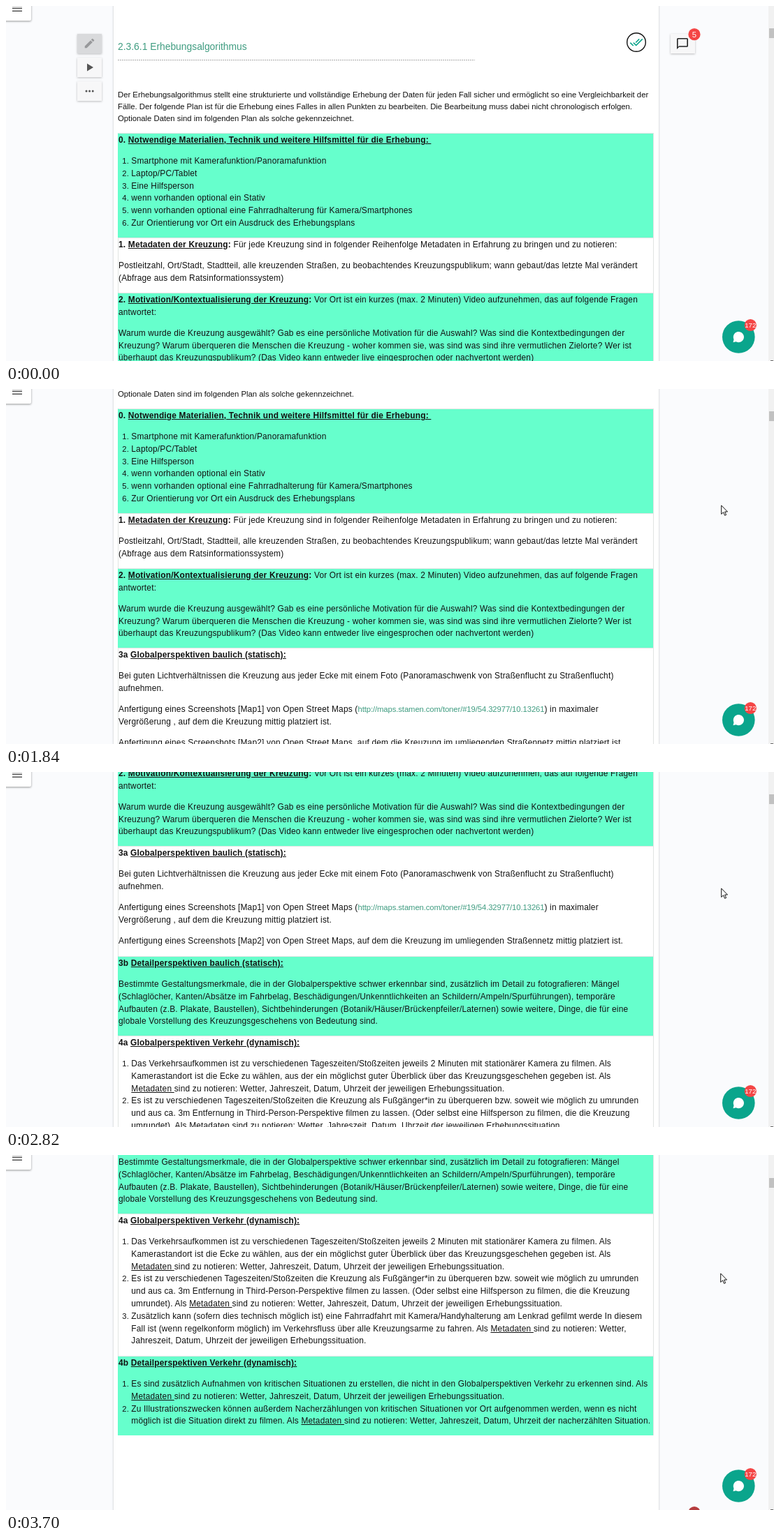
An HTML page that plays this animation: 1099 by 509 pixels, repeating every 3770 ms.

```html
<!DOCTYPE html>
<html lang="de">
<head>
<meta charset="utf-8">
<title>Erhebungsalgorithmus</title>
<style>
html, body { margin: 0; width: 100%; height: 100%; overflow: hidden; background: #fafbfd; }
body { position: relative; font: 11.92px/17.8px "Liberation Sans", Arial, sans-serif; color: #111; white-space: nowrap; }
#column { position: absolute; left: 153px; top: -5px; width: 780px; height: 520px; background: #fff; border: 1px solid #e3e4e6; box-shadow: 0 0 2px #e4e5e8; }
#doc { position: absolute; left: 0; top: 0; width: 1099px; height: 1250px; }
svg { position: absolute; left: 0; top: 0; }
h1 { position: absolute; left: 160px; top: 49px; margin: 0; font: 13.85px/18px "Liberation Sans", Arial, sans-serif; }
h1, a { color: #3f9c80; }
#intro { position: absolute; left: 160px; top: 119px; margin: 0; font-size: 11.3px; line-height: 17px; }
section { position: absolute; left: 160px; width: 767px; box-sizing: border-box; padding-top: 1px; border: 1px solid #e1e4e3; border-bottom: 0; letter-spacing: .185px; }
section:nth-of-type(odd) { background: #6fc; border-left-color: #6fc; }
section p, ol { margin: 0 0 12.2px; }
p.wide { margin-top: 13px; }
ol { padding-left: 18.3px; }
li::marker { font-size: 11.2px; }
a { font-size: 11.3px; letter-spacing: -.1px; }
.btn { fill: #f7f7f8; filter: drop-shadow(0 1px 1.5px rgba(0, 0, 0, .25)); }
.badge { fill: #f44545; }
svg text { fill: #fff; text-anchor: middle; }
</style>
</head>
<body>
<div id="column"></div>
<div id="doc">
  <h1>2.3.6.1 Erhebungsalgorithmus</h1>
  <p id="intro">Der Erhebungsalgorithmus stellt eine strukturierte und vollständige Erhebung der Daten für jeden Fall sicher und ermöglicht so eine Vergleichbarkeit der<br>Fälle. Der folgende Plan ist für die Erhebung eines Falles in allen Punkten zu bearbeiten. Die Bearbeitung muss dabei nicht chronologisch erfolgen.<br>Optionale Daten sind im folgenden Plan als solche gekennzeichnet.</p>

  <section style="top:182px;height:150px">
    <p><b>0. <u>Notwendige Materialien, Technik und weitere Hilfsmittel für die Erhebung:&nbsp;</u></b></p>
    <ol>
      <li>Smartphone mit Kamerafunktion/Panoramafunktion
      <li>Laptop/PC/Tablet
      <li>Eine Hilfsperson
      <li>wenn vorhanden optional ein Stativ
      <li>wenn vorhanden optional eine Fahrradhalterung für Kamera/Smartphones
      <li>Zur Orientierung vor Ort ein Ausdruck des Erhebungsplans
    </ol>
  </section>

  <section style="top:332px;height:79px">
    <p><b>1. <u>Metadaten der Kreuzung</u>:</b> Für jede Kreuzung sind in folgender Reihenfolge Metadaten in Erfahrung zu bringen und zu notieren:</p>
    <p>Postleitzahl, Ort/Stadt, Stadtteil, alle kreuzenden Straßen, zu beobachtendes Kreuzungspublikum; wann gebaut/das letzte Mal verändert<br>(Abfrage aus dem Ratsinformationssystem)</p>
  </section>

  <section style="top:411px;height:114px">
    <p><b>2. <u>Motivation/Kontextualisierung der Kreuzung</u>:</b> Vor Ort ist ein kurzes (max. 2 Minuten) Video aufzunehmen, das auf folgende Fragen<br>antwortet:</p>
    <p>Warum wurde die Kreuzung ausgewählt? Gab es eine persönliche Motivation für die Auswahl? Was sind die Kontextbedingungen der<br>Kreuzung? Warum überqueren die Menschen die Kreuzung - woher kommen sie, was sind was sind ihre vermutlichen Zielorte? Wer ist<br>überhaupt das Kreuzungspublikum? (Das Video kann entweder live eingesprochen oder nachvertont werden)</p>
  </section>

  <section style="top:525px;height:158px">
    <p><b>3a <u>Globalperspektiven baulich (statisch):</u></b></p>
    <p>Bei guten Lichtverhältnissen die Kreuzung aus jeder Ecke mit einem Foto (Panoramaschwenk von Straßenflucht zu Straßenflucht)<br>aufnehmen.</p>
    <p>Anfertigung eines Screenshots [Map1] von Open Street Maps (<a>http://maps.stamen.com/toner/#19/54.32977/10.13261</a>) in maximaler<br>Vergrößerung , auf dem die Kreuzung mittig platziert ist.</p>
    <p class="wide">Anfertigung eines Screenshots [Map2] von Open Street Maps, auf dem die Kreuzung im umliegenden Straßennetz mittig platziert ist.</p>
  </section>

  <section style="top:683px;height:114px">
    <p><b>3b <u>Detailperspektiven baulich (statisch):</u></b></p>
    <p>Bestimmte Gestaltungsmerkmale, die in der Globalperspektive schwer erkennbar sind, zusätzlich im Detail zu fotografieren: Mängel<br>(Schlaglöcher, Kanten/Absätze im Fahrbelag, Beschädigungen/Unkenntlichkeiten an Schildern/Ampeln/Spurführungen), temporäre<br>Aufbauten (z.B. Plakate, Baustellen), Sichtbehinderungen (Botanik/Häuser/Brückenpfeiler/Laternen) sowie weitere, Dinge, die für eine<br>globale Vorstellung des Kreuzungsgeschehens von Bedeutung sind.</p>
  </section>

  <section style="top:797px;height:204px">
    <p><b>4a <u>Globalperspektiven Verkehr (dynamisch):</u></b></p>
    <ol>
      <li>Das Verkehrsaufkommen ist zu verschiedenen Tageszeiten/Stoßzeiten jeweils 2 Minuten mit stationärer Kamera zu filmen. Als<br>Kamerastandort ist die Ecke zu wählen, aus der ein möglichst guter Überblick über das Kreuzungsgeschehen gegeben ist. Als<br><u>Metadaten </u>sind zu notieren: Wetter, Jahreszeit, Datum, Uhrzeit der jeweiligen Erhebungssituation.
      <li>Es ist zu verschiedenen Tageszeiten/Stoßzeiten die Kreuzung als Fußgänger*in zu überqueren bzw. soweit wie möglich zu umrunden<br>und aus ca. 3m Entfernung in Third-Person-Perspektive filmen zu lassen. (Oder selbst eine Hilfsperson zu filmen, die die Kreuzung<br>umrundet). Als <u>Metadaten </u>sind zu notieren: Wetter, Jahreszeit, Datum, Uhrzeit der jeweiligen Erhebungssituation.
      <li>Zusätzlich kann (sofern dies technisch möglich ist) eine Fahrradfahrt mit Kamera/Handyhalterung am Lenkrad gefilmt werde In diesem<br>Fall ist (wenn regelkonform möglich) im Verkehrsfluss über alle Kreuzungsarme zu fahren. Als <u>Metadaten </u>sind zu notieren: Wetter,<br>Jahreszeit, Datum, Uhrzeit der jeweiligen Erhebungssituation.
    </ol>
  </section>

  <section style="top:1001px;height:114px">
    <p><b>4b <u>Detailperspektiven Verkehr (dynamisch):</u></b></p>
    <ol>
      <li>Es sind zusätzlich Aufnahmen von kritischen Situationen zu erstellen, die nicht in den Globalperspektiven Verkehr zu erkennen sind. Als<br><u>Metadaten </u>sind zu notieren: Wetter, Jahreszeit, Datum, Uhrzeit der jeweiligen Erhebungssituation.
      <li>Zu Illustrationszwecken können außerdem Nacherzählungen von kritischen Situationen vor Ort aufgenommen werden, wenn es nicht<br>möglich ist die Situation direkt zu filmen. Als <u>Metadaten </u>sind zu notieren: Wetter, Jahreszeit, Datum, Uhrzeit der nacherzählten Situation.
    </ol>
  </section>

  <svg width="1099" height="1250">
    <path d="M160 77.5H671" stroke="#aaa" stroke-dasharray="2 1"/>
    <rect class="btn" x="102" y="40" width="35" height="28" style="fill:#d9dadc"/>
    <rect class="btn" x="102" y="74" width="35" height="28"/>
    <rect class="btn" x="102" y="108" width="35" height="28"/>
    <rect class="btn" x="951" y="40" width="35" height="28"/>
    <path transform="translate(110.5 44.5) scale(.75)" fill="#98999b" d="M3 17.25V21h3.75L17.81 9.94l-3.75-3.75zM20.71 7.04a1 1 0 0 0 0-1.41l-2.34-2.34a1 1 0 0 0-1.41 0l-1.83 1.83 3.75 3.75z"/>
    <path fill="#555" d="M116 82.5V93.5L125 88z"/>
    <path d="M115 122h.01M119.6 122h.01M124.2 122h.01" stroke="#555" stroke-width="3" stroke-linecap="round"/>
    <circle cx="902" cy="52" r="13.3" fill="#fff" stroke="#111" stroke-width="1.4"/>
    <path transform="translate(892.4 42.4) scale(.8)" fill="#0ca58c" d="M18 7l-1.41-1.41-6.34 6.34 1.41 1.41zM22.24 5.59L11.66 16.17 7.48 12l-1.41 1.41L11.66 19l12-12zM.41 13.41L6 19l1.41-1.41L1.83 12z"/>
    <path transform="translate(958.4 44.4) scale(.8)" fill="#222" d="M20 2H4a2 2 0 0 0-2 2v18l4-4h14a2 2 0 0 0 2-2V4a2 2 0 0 0-2-2zm0 14H6l-2 2V4h16z"/>
    <circle class="badge" cx="985" cy="40.7" r="8.6"/>
    <text x="985" y="44.7" font-size="11.3">5</text>
    <circle cx="985" cy="1225.7" r="8.6" fill="#b53c3e"/>
  </svg>
</div>

<svg width="1099" height="509">
  <rect class="btn" x="-5" y="-5" width="41" height="26" rx="2" style="fill:#fff;filter:drop-shadow(0 1px 1.5px rgba(0,0,0,.4))"/>
  <path d="M9 -.6H23M9 3.3H23M9 7.2H23" stroke="#555" stroke-width="1.5"/>
  <rect x="1091" width="8" height="509" fill="#f1f1f1"/>
  <rect id="thumb" x="1092" y="32" width="7" height="14" fill="#c1c1c1"/>
  <rect x="1094" y="508" width="4" height="1" fill="#666"/>
  <circle cx="1048.3" cy="474.5" r="23.3" fill="#0aa58c"/>
  <path fill="#fff" d="M1040.5 482.3l1-4.4a7.6 7.6 0 1 1 3.2 3.4z"/>
  <circle class="badge" cx="1065.3" cy="457.5" r="8.6"/>
  <text x="1065.3" y="461" font-size="9.6">172</text>
  <path id="cursor" fill="#fff" stroke="#111" d="M.7.9V13.4L3.6 10.7 5.6 15.3 7.6 14.4 5.6 10H9.5z"/>
</svg>

<script>
const LOOP = 3770;
// The screen refreshes in runs of even steps: [first, last, count]
const runs = [[0, 520, 8], [600, 600, 1], [1530, 2530, 14], [2820, 2990, 3], [3070, 3450, 6], [3610, 3700, 2]];
const ticks = runs.flatMap(([a, b, n]) =>
  Array.from({ length: n }, (_, i) => Math.round((a + (b - a) * i / Math.max(n - 1, 1)) / 10) * 10));

const scrollKeys = [[1450, 0], [1530, 46], [2070, 234], [2380, 343], [2530, 392], [2740, 392],
  [3070, 502], [3450, 624], [3530, 624], [3700, 713]];
const cursorKeys = [[70, 1062, 485], [300, 1037, 285], [520, 1025, 171], [600, 1023, 166],
  [3300, 1023, 166], [3450, 1022, 168], [3530, 1022, 168], [3610, 1022, 169]];

function at(keys, t) {
  const i = keys.findIndex(k => k[0] > t);
  if (i < 0) return keys[keys.length - 1].slice(1);
  if (i === 0) return keys[0].slice(1);
  const a = keys[i - 1], b = keys[i], f = (t - a[0]) / (b[0] - a[0]);
  return a.slice(1).map((v, j) => Math.round(v + (b[j + 1] - v) * f));
}

const $ = id => document.getElementById(id);

function draw(now) {
  const time = now % LOOP;
  const t = ticks.filter(k => k <= time).pop();
  const [scroll] = at(scrollKeys, t);
  $("doc").style.top = -scroll + "px";
  $("thumb").setAttribute("y", scroll > 450 ? 33 : 32);
  $("cursor").setAttribute("transform", `translate(${at(cursorKeys, t)})`);
  $("cursor").setAttribute("visibility", t < 70 ? "hidden" : "visible");
  requestAnimationFrame(draw);
}
requestAnimationFrame(draw);
</script>
</body>
</html>
```
